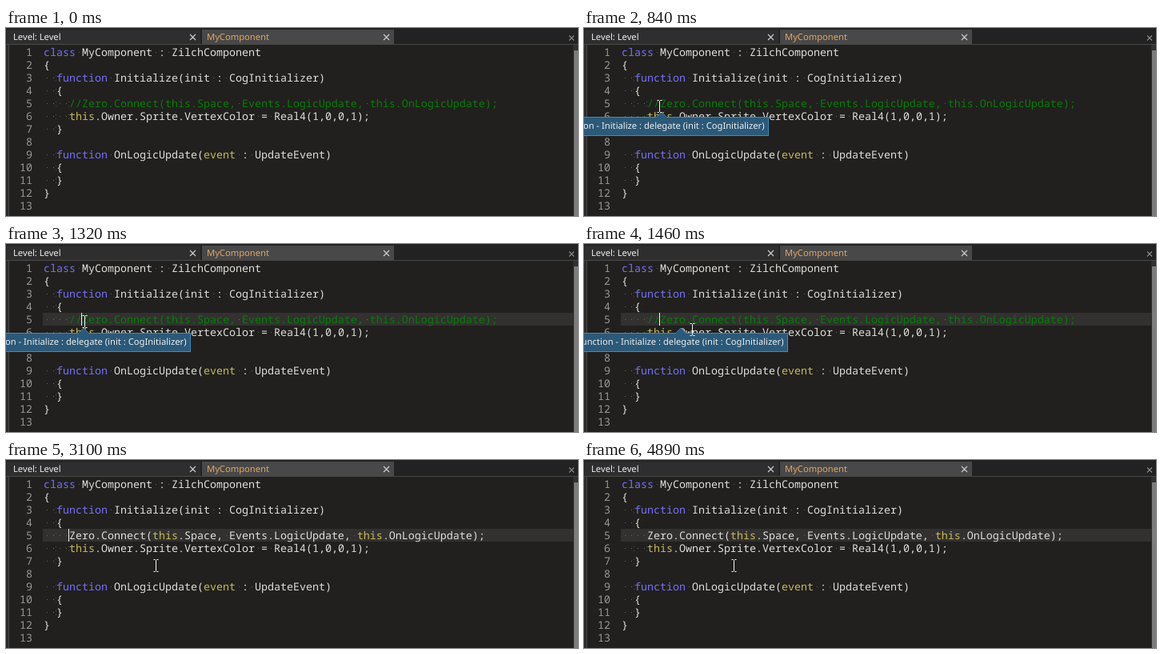
Write an HTML page that moves like this. It is 715x235 px and loops after 5440 ms.

```html
<!DOCTYPE html>
<html lang="en">
<head>
<meta charset="utf-8">
<title>Code editor</title>
<style>
  html, body { margin: 0; width: 100%; height: 100%; overflow: hidden; background: #21201e; }
  svg { display: block; width: 715px; height: 235px; }
  text { white-space: pre; text-rendering: geometricPrecision; }
  .code { font: 13.333px "Noto Sans Mono", monospace; fill: #dededa; }
  .num { fill: #969694; text-anchor: end; }
  .key { fill: #7470f4; }
  .self { fill: #c8b85a; }
  .note { fill: #067d06; }
  .dot { fill: #646462; }
  .guide { fill: #4c4c4a; }
  .ui { font: 11.2px "Noto Sans", "Open Sans", sans-serif; fill: #ececec; }
  .cross { fill: none; stroke: #d0d0d0; stroke-width: 1.1; }
</style>
</head>
<body>
<svg id="stage" viewBox="0 0 715 235">
  <rect width="715" height="235" fill="#21201e"/>
  <rect width="715" height="20" fill="#222222"/>
  <rect x="1" y="2" width="242" height="18" fill="#2e2e2e"/>
  <rect x="245" y="2" width="240" height="18" fill="#484848"/>
  <rect y="20" width="715" height="1" fill="#484848"/>
  <rect y="21" width="3" height="214" fill="#2b2b2b"/>
  <rect x="3" y="21" width="1" height="214" fill="#484848"/>
  <rect x="709" y="21" width="6" height="214" fill="#303030"/>
  <rect x="710" y="28" width="5" height="207" fill="#7c7c7c"/>
  <text class="ui" x="9" y="15">Level: Level</text>
  <text class="ui" x="251" y="15" style="fill:#dfa468">MyComponent</text>
  <path class="cross" d="M230 8l7 7m0-7l-7 7M472 8l7 7m0-7l-7 7"/>
  <path class="cross" d="M704 9.500l6 6m0-6l-6 6" style="stroke:#8c8c8c"/>
  <rect id="row" x="46" y="86" width="663" height="16" fill="#323130"/>
  <g id="lines"></g>
  <rect id="caret" y="86" width="1" height="16" fill="#f0f0f0"/>
  <g id="tip">
    <rect x="-134.500" y=".5" width="268" height="23" fill="#2b5979" stroke="#3c8cbe"/>
    <path d="M-7 1L0-6L7 1" fill="#2b5979" stroke="#3c8cbe" stroke-width=".8"/>
    <text class="ui" x="128.500" y="14.800" text-anchor="end">Function - Initialize : delegate (init : CogInitializer)</text>
  </g>
  <path id="mouse" d="M-3-7.500H-1L0-6.500L1-7.500H3M0-6.500V6.500M-3 7.500H-1L0 6.500L1 7.500H3" fill="none" stroke="#f4f4f4"/>
</svg>
<script>
const LOOP = 5440, LEFT = 47, TOP = 22, ROW = 16, CHAR = 8;
const $ = id => document.getElementById(id);

const call = "Zero.Connect(this.Space, Events.LogicUpdate, this.OnLogicUpdate);";
const source = [
  "class MyComponent : ZilchComponent",
  "{",
  "  function Initialize(init : CogInitializer)",
  "  {",
  "    //" + call,
  "    this.Owner.Sprite.VertexColor = Real4(1,0,0,1);",
  "  }",
  "",
  "  function OnLogicUpdate(event : UpdateEvent)",
  "  {",
  "  }",
  "}",
  ""
];

// Each table holds [start time, ...values]; a value stays until the next step.
const edits = [[0, "//"], [2550, "/"], [3100, ""]];
const carets = [
  [0, null], [1320, 94], [1620, null], [2320, 94], [2550, 86], [2950, null],
  [3100, 78], [3560, null], [4260, 78], [4890, null]
];
const tips = [
  [0, null], [540, 73, 127], [770, 89, 111], [840, 97, 111],
  [1390, 105, 111], [1460, 121, 111], [1540, null]
];
const moves = [
  [0, null], [460, 65.5, 128], [540, 73.5, 114], [610, 79.5, 106],
  [690, 85.5, 102], [770, 90.5, 99], [840, 94.5, 98], [920, 95.5, 97],
  [990, 96.5, 97], [1070, 97.5, 96], [1150, 98.5, 97], [1390, 112.5, 99],
  [1460, 135.5, 107], [1540, 168.5, 122], [1620, 187.5, 130], [2170, 187.5, 132]
];

function color(text) {
  if (text.trim().startsWith("//")) return `<tspan class="note">${text}</tspan>`;
  return text.replace(/\b(class|function|this|event)\b/g, word =>
    `<tspan class="${/class|function/.test(word) ? "key" : "self"}">${word}</tspan>`);
}

const dot = (kind, x, y) => `<rect class="${kind}" x="${x}" y="${y}" width="1" height="1"/>`;

function drawLine(text, i) {
  const y = TOP + i * ROW;
  let marks = "";
  [...text].forEach((c, col) => {
    if (c === " ") marks += dot("dot", LEFT + col * CHAR + 4, y + 8);
  });
  // Dotted guide at the end of each indent level.
  for (let col = 2; col <= text.search(/\S/); col += 2) {
    const x = LEFT + col * CHAR - 1;
    marks += dot("guide", x, y + 6) + dot("guide", x, y + 11);
  }
  return `<text class="code num" x="33" y="${y + 13}">${i + 1}</text>` +
    `<text class="code" x="${LEFT}" y="${y + 13}">${color(text)}</text>` + marks;
}

$("lines").innerHTML = source.map((text, i) => `<g>${drawLine(text, i)}</g>`).join("");
const edited = $("lines").children[4];
let prefix = "//";

const at = (steps, t) => steps.findLast(step => step[0] <= t).slice(1);
const show = (el, on) => el.setAttribute("visibility", on ? "visible" : "hidden");

function place(el, [x, y]) {
  show(el, x !== null);
  if (x !== null) el.setAttribute("transform", `translate(${x} ${y})`);
}

function render(t) {
  const [slashes] = at(edits, t), [x] = at(carets, t);
  if (slashes !== prefix) {
    prefix = slashes;
    edited.innerHTML = drawLine("    " + prefix + call, 4);
  }
  show($("row"), t >= 1320);
  show($("caret"), x !== null);
  if (x !== null) $("caret").setAttribute("x", x);
  place($("tip"), at(tips, t));
  place($("mouse"), at(moves, t));
}

const start = performance.now();
function tick() {
  render((performance.now() - start) % LOOP);
  requestAnimationFrame(tick);
}
tick();
</script>
</body>
</html>
```
